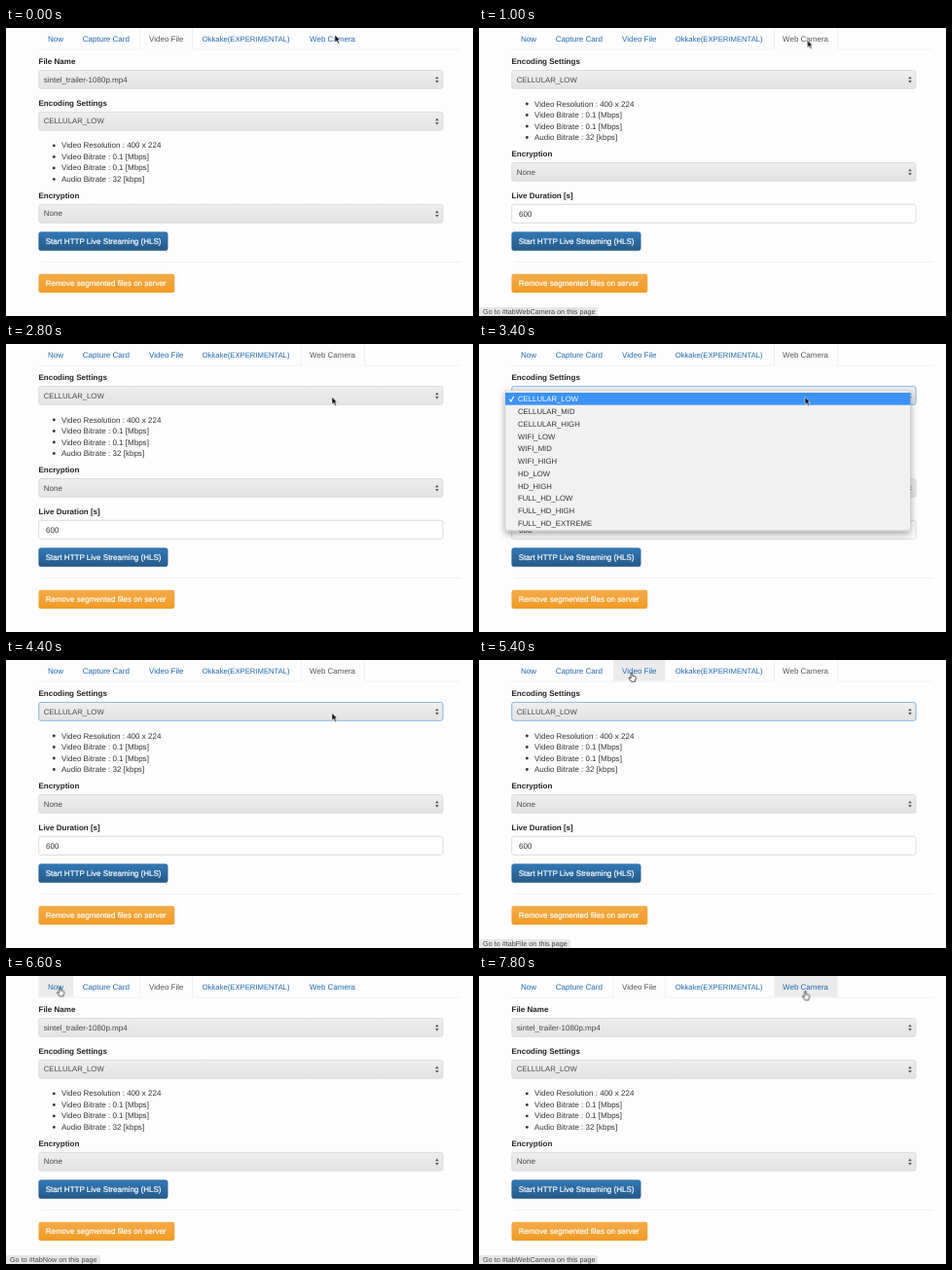
Write an HTML page that moves like this. It is 480x296 px and loops after 8000 ms.

```html
<!DOCTYPE html>
<html lang="en">
<head>
<meta charset="utf-8">
<title>Streaming settings</title>
<style>
html, body { margin: 0; width: 100%; height: 100%; overflow: hidden; background: #fdfdfd; }
svg { position: absolute; left: 0; top: 0; }
text, .status { font-family: "Liberation Sans", Arial, sans-serif; text-rendering: geometricPrecision; }
text { font-size: 8.03px; fill: #333; }
.label { font-weight: bold; fill: #222; }
.link { fill: #1f69b3; }
.long { font-size: 7.7px; }
.caps { font-size: 7.75px; font-kerning: none; }
.value { fill: #484848; }
.active { fill: #555; }
.button { fill: #fff; stroke: #fff; stroke-width: .2; }
.rule { stroke: #f0f0f0; }
.hover { fill: #ebebec; }
.box { fill: url(#grey); stroke: #d6d6d6; stroke-width: .8; }
.status {
  position: absolute; left: 0; bottom: 0; height: 9.5px; padding: 0 3px 0 4px;
  border-radius: 0 2px 0 0; background: #e6e6e6;
  color: #444; font-size: 7.22px; line-height: 10px; white-space: nowrap;
}

/* Everything switches in hard steps on one 8 s clock: 2.5% = 200 ms */
.step { animation: 8s step-end infinite; }
.hidden { visibility: hidden; }
.on-file { animation-name: on-file; }
.on-camera { animation-name: on-camera; }
.focus { animation-name: focus; }
.menu { animation-name: menu; }
.arrow { animation-name: arrow; }
.hand { animation-name: hand; }
.h-now { animation-name: h-now; }
.h-capture { animation-name: h-capture; }
.h-okkake { animation-name: h-okkake; }
.h-camera { animation-name: h-camera; }
.h-file { animation-name: h-file; }
.s-camera { animation-name: s-camera; }
.s-file { animation-name: s-file; }
.pointer { animation-name: pointer; }

@keyframes on-file { 0%, 70% { visibility: visible } 12.5% { visibility: hidden } }
@keyframes on-camera { 0%, 70% { visibility: hidden } 12.5% { visibility: visible } }
@keyframes focus { 0%, 70% { visibility: hidden } 37.5% { visibility: visible } }
@keyframes menu { 0%, 52.5% { visibility: hidden } 37.5% { visibility: visible } }
@keyframes hand { 0%, 12.5%, 70%, 92.5% { visibility: hidden } 10%, 67.5%, 80%, 95% { visibility: visible } }
@keyframes arrow { 0%, 12.5%, 70%, 92.5% { visibility: visible } 10%, 67.5%, 80%, 95% { visibility: hidden } }
@keyframes h-now { 0%, 87.5% { visibility: hidden } 82.5% { visibility: visible } }
@keyframes h-capture { 0%, 82.5%, 92.5% { visibility: hidden } 80%, 87.5% { visibility: visible } }
@keyframes h-okkake { 0%, 97.5% { visibility: hidden } 95% { visibility: visible } }
@keyframes h-camera { 0%, 12.5% { visibility: hidden } 10%, 97.5% { visibility: visible } }
@keyframes h-file { 0%, 70% { visibility: hidden } 67.5% { visibility: visible } }
@keyframes s-camera { 0%, 35% { visibility: hidden } 10%, 97.5% { visibility: visible } }
@keyframes s-file { 0%, 80%, 95% { visibility: hidden } 67.5%, 92.5% { visibility: visible } }
@keyframes pointer {
  0% { transform: translate(338px, 7px) }
  5% { transform: translate(338px, 9px) }
  10%, 12.5% { transform: translate(337.5px, 12.5px) }
  25% { transform: translate(338px, 20px) }
  27.5% { transform: translate(337px, 36px) }
  30% { transform: translate(335.5px, 50px) }
  32.5% { transform: translate(335px, 54.5px) }
  62.5% { transform: translate(320px, 48px) }
  65% { transform: translate(235px, 27px) }
  67.5% { transform: translate(157px, 13px) }
  70% { transform: translate(155.5px, 11px) }
  80% { transform: translate(103px, 12px) }
  82.5% { transform: translate(55.5px, 11.5px) }
  87.5% { transform: translate(84px, 12px) }
  90% { transform: translate(112px, 12px) }
  92.5% { transform: translate(160px, 12px) }
  95% { transform: translate(245px, 14px) }
  97.5% { transform: translate(335.5px, 15.5px) }
}
</style>
</head>
<body>
<svg width="480" height="296" viewBox="0 0 480 296">
  <defs>
    <linearGradient id="grey" x2="0" y2="1"><stop stop-color="#eee"/><stop offset="1" stop-color="#e3e3e3"/></linearGradient>
    <linearGradient id="blue" x2="0" y2="1"><stop stop-color="#3279b6"/><stop offset="1" stop-color="#265a88"/></linearGradient>
    <linearGradient id="orange" x2="0" y2="1"><stop stop-color="#f3ab49"/><stop offset="1" stop-color="#f09a25"/></linearGradient>
    <filter id="shadow" x="-10%" y="-10%" width="120%" height="130%">
      <feDropShadow dx="0" dy="3.5" stdDeviation="3.5" flood-opacity=".35"/>
    </filter>
    <g id="select">
      <rect class="box" x="33.7" y="43.5" width="415.3" height="18.8" rx="2.3"/>
      <path d="M441.2 52.3l1.8-2.6 1.8 2.6zM441.2 54l1.8 2.6 1.8-2.6z" fill="#555"/>
    </g>
    <g id="encoding">
      <text class="label" x="33.5" y="37.3">Encoding Settings</text>
      <use href="#select"/>
      <text class="value caps" x="38.7" y="55.6">CELLULAR_LOW</text>
      <g fill="#333">
        <circle cx="49.3" cy="78" r="1.4"/><circle cx="49.3" cy="89.5" r="1.4"/>
        <circle cx="49.3" cy="101" r="1.4"/><circle cx="49.3" cy="112.5" r="1.4"/>
      </g>
      <text x="57" y="80.5">Video Resolution : 400 x 224</text>
      <text x="57" y="92">Video Bitrate : 0.1 [Mbps]</text>
      <text x="57" y="103.5">Video Bitrate : 0.1 [Mbps]</text>
      <text x="57" y="115">Audio Bitrate : 32 [kbps]</text>
      <text class="label" x="33.5" y="132.3">Encryption</text>
      <use href="#select" y="95"/>
      <text class="value" x="38.7" y="150.5">None</text>
    </g>
  </defs>

  <path class="rule" d="M33 22H467"/>
  <rect class="hover step hidden h-now" x="33.5" width="35.5" height="21.5"/>
  <rect class="hover step hidden h-capture" x="70" width="66.5" height="21.5"/>
  <rect class="hover step hidden h-file" x="138" width="53.5" height="21.5"/>
  <rect class="hover step hidden h-okkake" x="193" width="109" height="21.5"/>
  <rect class="hover step hidden h-camera" x="303.5" width="65" height="21.5"/>
  <path class="rule step on-file" d="M138 -1V22.5H191.5V-1" fill="#fdfdfd" style="stroke-dasharray:23 54.5 23.5 99"/>
  <path class="rule step hidden on-camera" d="M303.5 -1V22.5H368.5V-1" fill="#fdfdfd" style="stroke-dasharray:23 66 23.5 99"/>
  <text class="link" x="43" y="13.8">Now</text>
  <text class="link" x="78.8" y="13.8">Capture Card</text>
  <text class="active step on-file" x="147" y="13.8">Video File</text>
  <text class="link step hidden on-camera" x="147" y="13.8">Video File</text>
  <text class="link long" x="201.7" y="13.8">Okkake(EXPERIMENTAL)</text>
  <text class="link step on-file" x="312" y="13.8">Web Camera</text>
  <text class="active step hidden on-camera" x="312" y="13.8">Web Camera</text>

  <g class="step on-file">
    <text class="label" x="33.5" y="37">File Name</text>
    <use href="#select"/>
    <text class="value" x="38.7" y="55.6">sintel_trailer-1080p.mp4</text>
    <use href="#encoding" y="42.9"/>
  </g>
  <g class="step hidden on-camera">
    <use href="#encoding"/>
    <text class="label" x="33.5" y="175.1">Live Duration [s]</text>
    <rect x="33.7" y="181.3" width="415.3" height="19" rx="2.3" fill="#fff" stroke="#d2d2d2" stroke-width=".8"/>
    <text x="41" y="193.7">600</text>
  </g>
  <rect class="step hidden focus" x="33.7" y="43.5" width="415.3" height="18.8" rx="2.3" fill="none" stroke="#8bbce8"/>

  <rect x="33.7" y="209.7" width="132.5" height="19" rx="2.3" fill="url(#blue)" stroke="#2a6092" stroke-width=".5"/>
  <text class="button" x="40.7" y="222">Start HTTP Live Streaming (HLS)</text>
  <path class="rule" d="M37 240.5H467"/>
  <rect x="33.5" y="252.8" width="139.8" height="19.2" rx="2.3" fill="url(#orange)"/>
  <text class="button" x="40.7" y="265.3">Remove segmented files on server</text>

  <g class="step hidden menu">
    <path d="M27 48H443.5V189.5q0 2.3-2.3 2.3H29.3q-2.3 0-2.3-2.3z" fill="#f1f1f1" stroke="#bbb" stroke-width=".5" filter="url(#shadow)"/>
    <rect x="27" y="50" width="416.5" height="12.7" fill="#3d92f8"/>
    <path d="M31.3 56.8l1.6 2.2 2.8-5.2" fill="none" stroke="#fff" stroke-width="1.1"/>
    <g class="options">
      <text class="caps" x="40" y="59.4" style="fill:#fff">CELLULAR_LOW</text>
      <text class="caps" x="40" y="72.1">CELLULAR_MID</text>
      <text class="caps" x="40" y="84.9">CELLULAR_HIGH</text>
      <text class="caps" x="40" y="97.6">WIFI_LOW</text>
      <text class="caps" x="40" y="110.3">WIFI_MID</text>
      <text class="caps" x="40" y="123.1">WIFI_HIGH</text>
      <text class="caps" x="40" y="135.8">HD_LOW</text>
      <text class="caps" x="40" y="148.5">HD_HIGH</text>
      <text class="caps" x="40" y="161.2">FULL_HD_LOW</text>
      <text class="caps" x="40" y="174">FULL_HD_HIGH</text>
      <text class="caps" x="40" y="186.7">FULL_HD_EXTREME</text>
    </g>
  </g>
</svg>

<div class="status step hidden s-camera">Go to #tabWebCamera on this page</div>
<div class="status step hidden s-file">Go to #tabFile on this page</div>
<div class="status step hidden h-capture">Go to #tabCapture on this page</div>
<div class="status step hidden h-now">Go to #tabNow on this page</div>
<div class="status step hidden h-okkake">Go to #tabOkkake on this page</div>

<svg width="480" height="296" viewBox="0 0 480 296">
  <g class="step pointer">
    <path class="step arrow" d="M0 0V7.6L1.8 6 3.2 9 4.6 8.4 3.3 5.5H5.6Z" fill="#111" stroke="#fff" stroke-width=".6"/>
    <path class="step hidden hand" d="M-.9 .6Q0-.5 .8 .6V3.4L3.6 4Q4.4 4.3 4.3 5.3L3.4 9.2H-.5L-2.9 5.7Q-2.9 4.7-1.9 5L-.9 5.9Z" fill="#fff" stroke="#222" stroke-width=".8"/>
  </g>
</svg>
</body>
</html>
```
